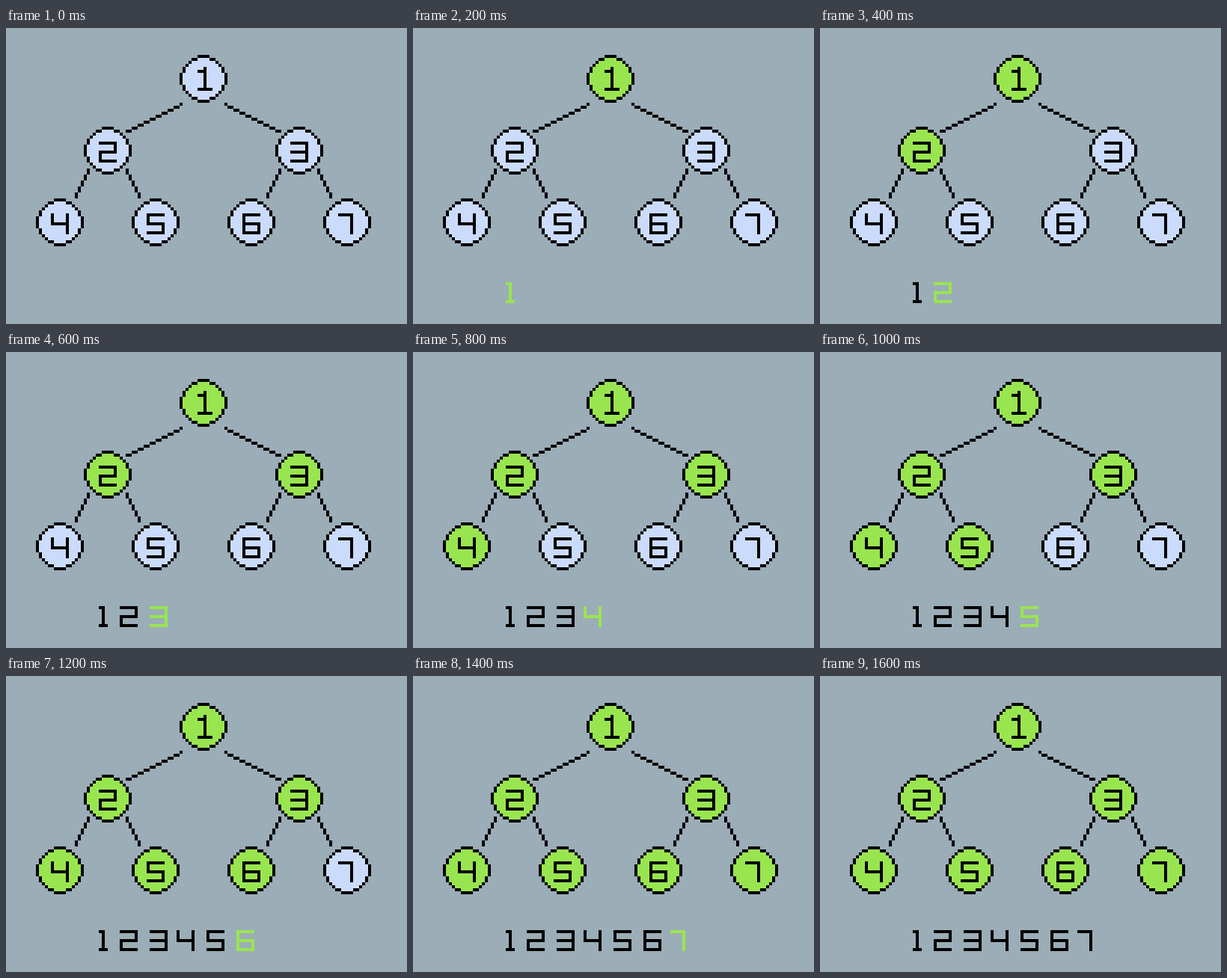
Animation, 536 px wide and 396 px high, one loop 2.3 s. Source, as an HTML page with a canvas:

```html
<!DOCTYPE html>
<html lang="en">
<head>
<meta charset="utf-8">
<title>Breadth-first traversal</title>
<style>
  html, body { margin: 0; width: 100%; height: 100%; overflow: hidden; background: #9badb7; }
  canvas { display: block; }
</style>
</head>
<body>
<canvas id="stage" width="536" height="396"></canvas>
<script>
const ctx = document.getElementById('stage').getContext('2d');
ctx.scale(4, 4); // one unit is one chunky pixel

const LOOP = 2300, STEP = 200, RADIUS = 7.75;
const BACK = '#9badb7', IDLE = '#cbdbfc', VISITED = '#99e550', INK = '#000';

// Strokes through "xy" cells; "|" lifts the pen.
const GLYPHS = {
  1: '00 10 16|06 26',
  2: '00 50 53 03 06 56',
  3: '00 50 56 06|03 53',
  4: '00 03 53|50 56',
  5: '50 00 03 53 56 06',
  6: '50 00 06 56 53 03',
  7: '00 40 46',
  root: '20 27|01 21|07 47'
};
const NODES = [[66, 17], [34, 41], [98, 41], [18, 65], [50, 65], [82, 65], [114, 65]];
const LIST_X = [31, 38, 48, 57, 67, 77, 86];

function box(x, y, color, w = 1, h = 1) {
  ctx.fillStyle = color;
  ctx.fillRect(x, y, w, h);
}

function glyph(name, x, y, color) {
  for (const stroke of GLYPHS[name].split('|')) {
    const points = stroke.split(' ').map(p => [+p[0], +p[1]]);
    points.slice(1).forEach(([bx, by], i) => {
      const [ax, ay] = points[i];
      box(x + Math.min(ax, bx), y + Math.min(ay, by), color,
          Math.abs(ax - bx) + 1, Math.abs(ay - by) + 1);
    });
  }
}

function disc(cx, cy, fill) {
  const outside = (dx, dy) => Math.hypot(dx, dy) > RADIUS;
  for (let y = -8; y < 8; y++) {
    for (let x = -8; x < 8; x++) {
      const dx = Math.abs(x + 0.5), dy = Math.abs(y + 0.5);
      if (outside(dx, dy)) continue;
      const rim = outside(dx + 1, dy) || outside(dx, dy + 1);
      box(cx + x, cy + y, rim ? INK : fill);
    }
  }
}

// A pair of branches mirrored about the parent's centre.
function branches(cx, y, offset, count, dx, dy) {
  for (let i = 0; i < count; i++) {
    const x = offset + dx(i), row = y + dy(i);
    box(cx + x, row, INK);
    box(cx - 1 - x, row, INK);
  }
}

function draw(step) {
  box(0, 0, BACK, 134, 99);
  branches(66, 25, 7, 19, i => i, i => (i + 1) >> 1);
  for (const cx of [34, 98]) branches(cx, 47, 6, 10, i => i >> 1, i => i);

  NODES.forEach(([x, y], i) => {
    disc(x, y, i < step ? VISITED : IDLE);
    if (i === 0) glyph('root', x - 2, y - 4, INK);
    else glyph(i + 1, x - 3, y - 3, INK);
    if (i < step) glyph(i + 1, LIST_X[i], 85, i === step - 1 ? VISITED : INK);
  });
}

function tick() {
  draw(Math.min(8, Math.floor(performance.now() % LOOP / STEP)));
  requestAnimationFrame(tick);
}
tick();
</script>
</body>
</html>
```
